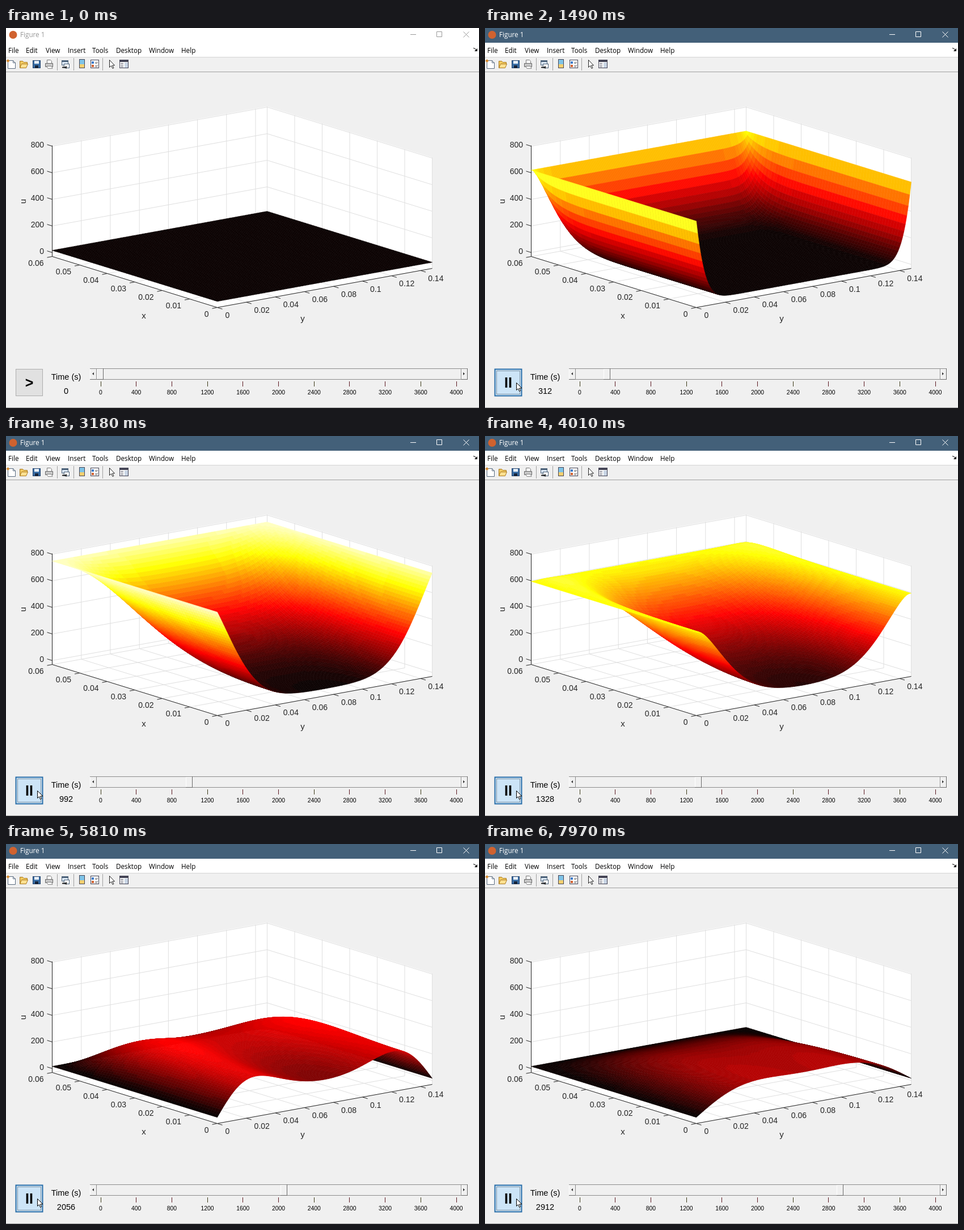
An HTML page with a canvas for the animation above (8000 ms loop, 834 px wide and 671 px high).

```html
<!DOCTYPE html>
<html>
<head>
<meta charset="utf-8">
<style>
html, body { margin: 0; width: 100%; height: 100%; overflow: hidden; background: #f0f0f0; }
svg, canvas { position: absolute; left: 0; top: 0; }
text { font-family: "Liberation Sans", Arial, sans-serif; fill: #262626; }
.ui { font-family: "Open Sans", "Noto Sans", sans-serif; font-size: 11.7px; fill: #000; }
.tick { font-size: 14px; }
.label { font-size: 15px; }
.ctl { font-size: 14.5px; fill: #000; }
.small { font-size: 10.4px; fill: #000; }
.mid { text-anchor: middle; }
.end { text-anchor: end; }
</style>
</head>
<body>
<svg id="stage" width="834" height="671" viewBox="0 0 834 671"></svg>
<canvas id="plot" width="834" height="671"></canvas>
<script>
const stage = document.getElementById('stage');
const ctx = document.getElementById('plot').getContext('2d');

// ---- svg helpers
function add(tag, attrs, content) {
  const el = document.createElementNS('http://www.w3.org/2000/svg', tag);
  for (const k in attrs) el.setAttribute(k, attrs[k]);
  if (content !== undefined) el.textContent = content;
  return stage.appendChild(el);
}
const rect = (x, y, w, h, fill, stroke = 'none') => add('rect', { x, y, width: w, height: h, fill, stroke });
const path = (d, stroke, fill = 'none', width = 1) => add('path', { d, stroke, fill, 'stroke-width': width });
const text = (x, y, cls, s) => add('text', { x, y, class: cls }, s);

// ---- window frame
const bar = rect(0, 0, 834, 26, '#fff');
add('circle', { cx: 12.5, cy: 12, r: 7, fill: '#d0622f' });
const title = text(25, 16, 'ui', 'Figure 1');
const winButtons = path('M713 11.5h10M759.5 6.5h9v9h-9zM806.5 6.5l10 10M816.5 6.5l-10 10', '#999');
rect(0, 26, 834, 25, '#fff');
Object.entries({ File: 4, Edit: 35, View: 70, Insert: 109, Tools: 152, Desktop: 194, Window: 252, Help: 309 })
  .forEach(([name, x]) => text(x, 43.5, 'ui', name));
path('M824 35.5q4 0 5 4', '#000');
path('M831 36v5h-5z', 'none', '#000');
path('M0 51.5H834', '#d4d4d4');
path('M0 77.5H834M90.5 53v22M119.5 53v22M170.5 53v22', '#a0a0a0');
path('M0 670.5H834', '#a0a0a0');

// ---- toolbar icons
path('M3.5 57.5h9l4 4v10h-13z', '#5a6b80', '#fff');
path('M12.5 57.5v4h4', '#5a6b80');
path('M1 58h5M3.5 55.500v5', '#d08020', 'none', 2);
path('M24.500 70.5v-12h5l2 2h6v4', '#a87820', '#f0c860');
path('M24.500 70.5l3-7h11l-3 7z', '#a87820', '#ffe090');
rect(47.5, 57.5, 13, 13, '#3a6ea5', '#1f3f6a');
rect(50, 58, 8, 5, '#e8f0f8');
rect(51, 66, 6, 5, '#16243a');
path('M72.500 63v-6.500h6l2 2v4.500', '#777', '#fff');
path('M69.5 62.5h13v6h-13z', '#666', '#c8c8c8');
path('M72 67.5h8l2 4h-8z', '#888', '#fff');
rect(98.5, 57.5, 11, 8, '#dce8f4', '#4a6078');
rect(98, 57, 12, 3, '#4a6078');
rect(102.5, 63.5, 9, 7, '#fff', '#4a6078');
path('M99 69.500h7M106 67.500v4', '#222', 'none', 2);
rect(129.5, 55.5, 9, 15, '#7fc4e8', '#445');
rect(130, 64, 8, 6, '#f4d070');
rect(149.500, 56.5, 14, 14, '#fff', '#445');
rect(151, 59, 4, 4, '#3a78c8');
rect(151, 65, 4, 4, '#d06030');
path('M157 60.500h5M157 62.500h4M157 66.500h5M157 68.500h4', '#777');
path('M182.500 56.500v13l3-3 2.500 5 2-1-2.500-4.500h4z', '#222', '#fff');
rect(200.5, 56.5, 15, 14, '#fff', '#445');
rect(201, 57, 14, 3, '#445');
rect(209, 61, 6, 9, '#c8d4e4');
path('M202 62.500h5M202 65.500h5M202 68.500h5', '#556');

// ---- axes: fractions fx along x, fy along y, height z
const X = 0.06, Y = 0.148, ZMIN = -30, ZMAX = 805, K = 0.2347;
const proj = (fx, fy, z) => [
  372.5 - 291 * fx + 379 * fy,
  493.5 - 90 * fx - 69 * fy - (z - ZMIN) * K
];
const line = (...pts) => 'M' + pts.map(p => proj(...p).map(v => v.toFixed(2)).join(' ')).join('L');
const xs = [0, 1, 2, 3, 4, 5, 6].map(k => k / 6);
const ys = [0, 1, 2, 3, 4, 5, 6, 7].map(k => k * 0.02 / Y);
const zs = [0, 200, 400, 600, 800];

path(line([0, 0, ZMIN], [1, 0, ZMIN], [1, 0, ZMAX], [1, 1, ZMAX], [0, 1, ZMAX], [0, 1, ZMIN]) + 'z', 'none', '#fff');
path(
  xs.map(f => line([f, 0, ZMIN], [f, 1, ZMIN], [f, 1, ZMAX])).join('') +
  ys.map(f => line([0, f, ZMIN], [1, f, ZMIN], [1, f, ZMAX])).join('') +
  zs.map(z => line([1, 0, z], [1, 1, z], [0, 1, z])).join(''), '#dfdfdf');
path(line([1, 0, ZMAX], [1, 0, ZMIN], [0, 0, ZMIN], [0, 1, ZMIN]), '#262626');
const mark = (p, dx, dy) => line(p) + `l${dx} ${dy}`;
path(
  xs.map(f => mark([f, 0, ZMIN], -9, 1.7)).join('') +
  ys.map(f => mark([0, f, ZMIN], 9, 2.8)).join('') +
  zs.map(z => mark([1, 0, z], -9, -2.8)).join(''), '#262626');
xs.forEach((f, k) => text(357.5 - 48.5 * k, 509.5 - 15 * k, 'tick end', k ? '0.0' + k : '0'));
ys.forEach((f, k) => text(386.5 + 51.1 * k, 512 - 9.3 * k, 'tick', String(k * 2 / 100)));
zs.forEach(z => text(67, 399 - z * K, 'tick end', z));
text(243, 513, 'label mid', 'x');
text(523, 518, 'label mid', 'y');
add('text', { class: 'label mid', transform: 'translate(35 306) rotate(-90)' }, 'u');

// ---- controls
const button = rect(17.5, 602.5, 47, 47, '#e1e1e1', '#adadad');
const focus = add('rect', { x: 20.5, y: 605.5, width: 41, height: 41, fill: 'none', stroke: '#345', 'stroke-dasharray': '1 1' });
const play = add('text', { x: 41, y: 635, class: 'mid', 'font-size': 25, 'font-weight': 'bold', style: 'fill:#000' });
text(106, 621, 'ctl mid', 'Time (s)');
const clock = text(106, 646, 'ctl mid', '0');
rect(148, 601, 666, 20, '#f0f0f0');
path('M148 601.5H814M159.500 601v20M802.500 601v20M159 620.500H803', '#8c8c8c');
path('M148.500 602v18M803.500 602v18', '#fff');
path('M148 620.500h11M803 620.500h11M813.500 601v20', '#696969');
path('M155 608v5l-3-2.500zM806 608v5l3-2.500z', 'none', '#333');
const thumb = add('g', {});
thumb.append(
  path('M160 602.500h11M160.500 602v18', '#fff'),
  path('M160 620.500h11.500M171.500 601v20', '#696969'));
for (let k = 0; k <= 10; k++) {
  const x = 167 + 62.7 * k;
  path(`M${Math.floor(x) + 0.5} 624v9`, k % 3 ? '#5c1a22' : '#3c3a18');
  text(x, 647, 'small mid', k * 400);
}
const cursor = path('M0 0v13l3-2.800 2 4.800 2.200-1-2-4.500h4.300z', '#000', '#fff');

// ---- playback: [first, last, count] of picture updates in ms
const steps = [[610, 1350, 9], [1490, 2260, 9], [2320, 3050, 9], [3180, 3940, 9], [4010, 4370, 5],
  [4510, 4740, 4], [4870, 5310, 6], [5440, 5490, 2], [5640, 5810, 3], [5880, 6400, 6],
  [6470, 7200, 9], [7350, 7970, 8]
].flatMap(([a, b, n]) => Array.from({ length: n }, (_, k) => a + (b - a) * k / (n - 1)));
const clockCurve = [[0, 0], [700, 0], [1490, 312], [2260, 616], [3180, 992], [4740, 1616], [5810, 2056], [7970, 2912]];
// edge temperature over simulated seconds
const edgeCurve = [[0, 16], [150, 16], [200, 130], [250, 370], [312, 620], [380, 735], [470, 795], [616, 800],
  [800, 780], [992, 748], [1180, 690], [1300, 628], [1468, 430], [1616, 165], [1720, 50], [1800, 16], [4000, 16]];

function sample(curve, t) {
  const k = Math.max(1, curve.findIndex(p => p[0] >= t));
  const [a, b] = [curve[k - 1], curve[k]];
  return a[1] + (b[1] - a[1]) * (t - a[0]) / (b[0] - a[0]);
}
const seconds = ms => 8 * Math.round(sample(clockCurve, ms) / 8);

// ---- heat equation: three heated edges, insulated edge at x = 0, 1 mm cells
const NX = 60, NY = 148, W = NY + 1, SUB = 12;
const R = 3.1e-7 * 8 / SUB / 1e-6;
const fields = new Map();
(function solve() {
  const wanted = new Set([0, ...steps.map(seconds)]);
  let u = new Float32Array((NX + 1) * W).fill(16), next = u.slice();
  for (let s = 0; s <= 2912; s += 8) {
    if (wanted.has(s)) fields.set(s, u.slice());
    for (let k = 1; k <= SUB; k++) {
      const edge = sample(edgeCurve, s + 8 * k / SUB);
      for (let i = 0; i < NX; i++) {
        const row = i * W;
        for (let j = 1; j < NY; j++) {
          const c = row + j;
          next[c] = u[c] + R * (u[c + W] + u[i ? c - W : c + W] + u[c - 1] + u[c + 1] - 4 * u[c]);
        }
        next[row] = next[row + NY] = edge;
      }
      next.fill(edge, NX * W);
      [u, next] = [next, u];
    }
  }
})();

// ---- surface
const clamp = v => Math.round(255 * Math.min(1, Math.max(0, v)));
const hot = Array.from({ length: 64 }, (_, k) =>
  `rgb(${clamp((k + 1) / 24)},${clamp((k - 23) / 24)},${clamp((k - 47) / 16)})`);

function drawSurface(u) {
  ctx.clearRect(0, 0, 834, 671);
  ctx.lineWidth = 0.6;
  ctx.lineJoin = 'round';
  const pt = (i, j) => proj(i / NX, j / NY, u[i * W + j]);
  for (let i = NX - 1; i >= 0; i--) {
    for (let j = NY - 1; j >= 0; j--) {
      const level = Math.floor((u[i * W + j] - 16) / 784 * 64);
      ctx.fillStyle = ctx.strokeStyle = hot[Math.min(63, Math.max(0, level))];
      ctx.beginPath();
      ctx.moveTo(...pt(i, j));
      ctx.lineTo(...pt(i + 1, j));
      ctx.lineTo(...pt(i + 1, j + 1));
      ctx.lineTo(...pt(i, j + 1));
      ctx.closePath();
      ctx.fill();
      ctx.stroke();
    }
  }
}

function paint(el, fill, stroke, width = 1) {
  el.setAttribute('fill', fill);
  el.setAttribute('stroke', stroke);
  el.setAttribute('stroke-width', width);
}

let shown = -1;
function frame() {
  const t = performance.now() % 8000;
  const active = t >= 610;
  bar.setAttribute('fill', active ? '#436079' : '#fff');
  title.style.fill = active ? '#fff' : '#999';
  winButtons.setAttribute('stroke', active ? '#fff' : '#999');
  play.textContent = active ? 'II' : '>';
  focus.setAttribute('visibility', active ? 'visible' : 'hidden');
  if (t < 210) paint(button, '#e1e1e1', '#adadad');
  else if (t < 360) paint(button, '#e5f1fb', '#0078d7');
  else if (t < 410) paint(button, '#d8eaf9', '#0067b8');
  else paint(button, '#cce4f7', '#2a6ea8', active ? 2 : 1);
  cursor.setAttribute('visibility', t < 160 ? 'hidden' : 'visible');
  cursor.setAttribute('transform', t < 210 ? 'translate(77.500 633.500)' : 'translate(55.500 626.500)');

  const s = seconds(steps.filter(m => m <= t).pop() || 0);
  if (s !== shown) {
    shown = s;
    clock.textContent = s;
    thumb.setAttribute('transform', `translate(${Math.round(s * 0.1578)} 0)`);
    drawSurface(fields.get(s));
  }
  requestAnimationFrame(frame);
}
frame();
</script>
</body>
</html>
```
